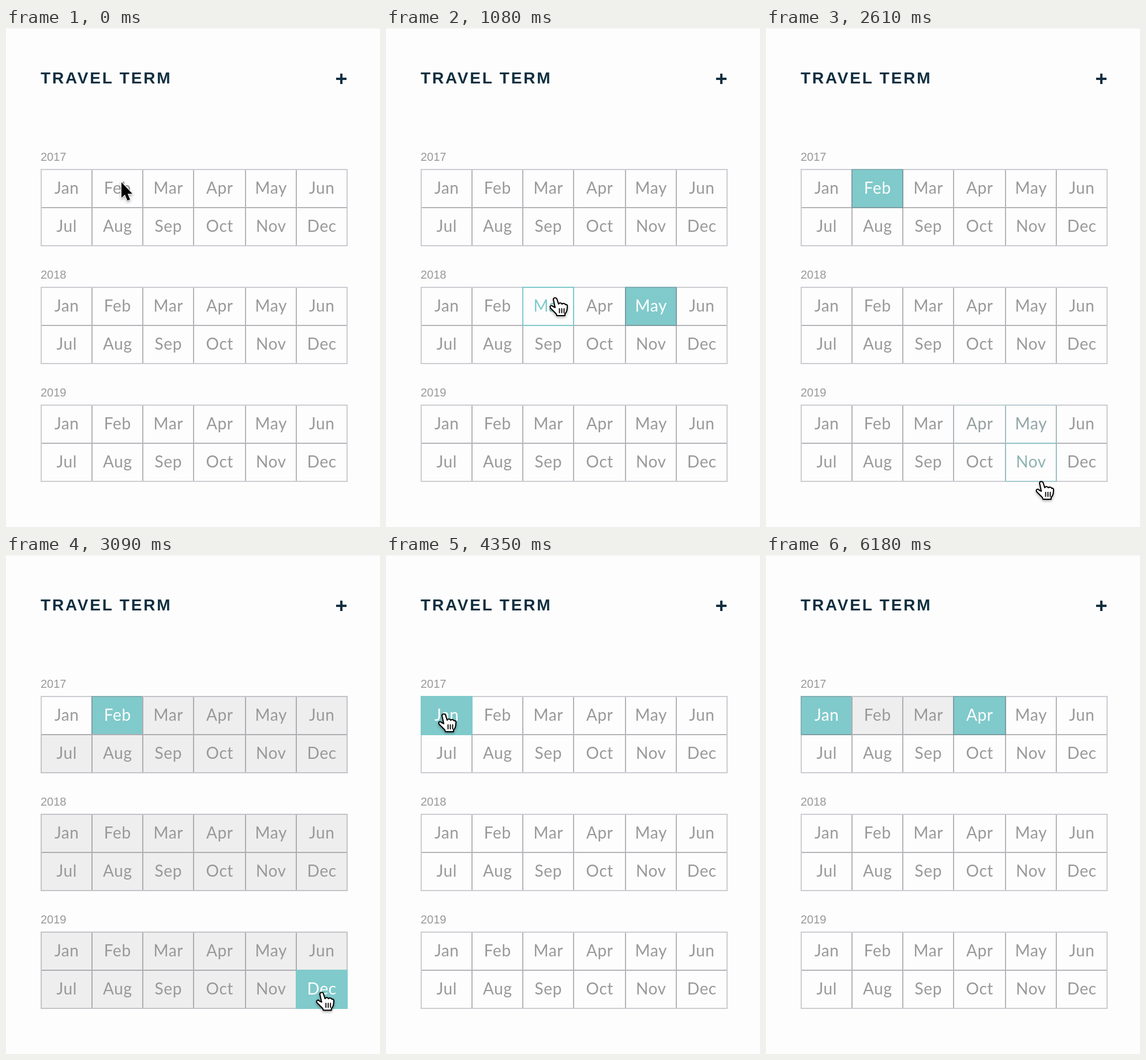
Recreate the animation shown at these times as an HTML page. Size 648 by 864 pixels, loop 6210 ms.

```html
<!DOCTYPE html>
<html lang="en">
<head>
<meta charset="utf-8">
<title>Travel term</title>
<style>
  html, body { margin: 0; width: 100%; height: 100%; overflow: hidden; background: #fdfdfd; }
  svg { display: block; width: 648px; height: 864px; }
  text { font-kerning: none; }
  .title { font: 700 28px "Liberation Sans", Arial, sans-serif; letter-spacing: 2.8px; fill: #102f40; }
  .year { font: 400 20px "Liberation Sans", Arial, sans-serif; fill: #999; }
  .month { font: 400 28px Lato, sans-serif; letter-spacing: .6px; text-anchor: middle; }
  .outer { stroke: rgba(130, 130, 145, .4); }
  .inner { stroke: rgba(120, 120, 130, .55); }
  .shadow { filter: drop-shadow(0 2px 2px rgba(0, 0, 0, .35)); }
</style>
</head>
<body>
<svg id="stage" viewBox="0 0 648 864">
  <path d="M0 .5H648" stroke="#f2f2f2"/>
  <text class="title" x="60" y="96">TRAVEL TERM</text>
  <path d="M572 88H590M581 79V97" stroke="#102f40" stroke-width="4"/>
  <g id="fills"></g>
  <g id="lines" fill="none" stroke-width="2"></g>
  <g id="hovers" fill="none" stroke="#80cacb" stroke-width="2"></g>
  <g id="labels"></g>
  <g id="cursor" class="shadow">
    <path id="arrow" d="M0 0V27L6 21.500L10.500 32L15 30L10.700 20H19Z" fill="#000"
      stroke="#fff" stroke-width="2" paint-order="stroke"/>
    <g id="hand" stroke="#000" stroke-width="2" stroke-linejoin="round" stroke-linecap="round">
      <path fill="#fff" d="M-3 3C-3 0 2 -1 3 2L6 11C8 8 11 9 12 11C14 9 17 10 18 12
        C20 11 22 13 21 17C21 22 20 25 17 28V31H3L2 28C-1 25 -5 21 -8 18C-10 14 -6 12 -4 15L0 17Z"/>
      <path d="M7.500 19V26M11.500 19V26M15.500 19V26" fill="none" stroke-width="1.800"/>
    </g>
  </g>
</svg>
<script>
const LOOP = 6210, STEP = 15, TRAIL = 8;
const COLS = [60, 148, 236, 324, 414, 502, 590];
const ROWS = [244, 310, 376];
const YEAR_GAP = 204;
const MONTHS = 'Jan Feb Mar Apr May Jun Jul Aug Sep Oct Nov Dec'.split(' ');

const BG = [253, 253, 253], TEAL = [128, 202, 203], RANGE = [238, 238, 238];
const GREY = [153, 153, 153], WHITE = [255, 255, 255];

// time, first and last selected month counted from Jan 2017
const PICKS = [
  [0, -1, -1], [690, 16, 16], [1200, 14, 14], [1950, 1, 1], [2940, 1, 35],
  [3390, 17, 35], [3440, 17, 17], [4170, 0, 0], [4890, 0, 3]
];

const EASE = {
  line: p => p,
  in: p => p * p,
  out: p => p * (2 - p),
  both: p => p * p * (3 - 2 * p)
};

// time, pointer tip, easing towards this point
const PATH = [
  [0, 200, 267], [60, 200, 267], [600, 455, 480, 'both'], [750, 455, 480], [1050, 293, 467, 'both'],
  [1290, 293, 467], [1800, 193, 284, 'both'], [2100, 193, 284], [2550, 446, 710, 'in'],
  [2610, 477, 785, 'out'], [2820, 546, 758, 'both'], [3180, 547, 757], [3375, 541, 500, 'both'],
  [3570, 541, 500], [4080, 100, 275, 'both'], [4440, 100, 275], [4800, 371, 277, 'both'],
  [4980, 371, 277], [5400, 570, 172, 'both'], [5640, 655, 140, 'in']
];

const $ = id => document.getElementById(id);

function add(parent, tag, attrs, text) {
  const el = document.createElementNS('http://www.w3.org/2000/svg', tag);
  for (const k in attrs) el.setAttribute(k, attrs[k]);
  if (text) el.textContent = text;
  parent.appendChild(el);
  return el;
}

const cells = [];
for (let y = 0; y < 3; y++) {
  const dy = y * YEAR_GAP;
  add($('labels'), 'text', { class: 'year', x: 60, y: 230 + dy }, String(2017 + y));
  MONTHS.forEach((name, m) => {
    const x = COLS[m % 6], right = COLS[m % 6 + 1] + 2;
    const row = Math.floor(m / 6), top = ROWS[row] + dy, bottom = ROWS[row + 1] + dy + 2;
    const w = right - x, h = bottom - top;
    cells.push({
      x, top, right, bottom,
      fill: add($('fills'), 'rect', { x, y: top, width: w, height: h }),
      ring: add($('hovers'), 'rect', { x: x + 1, y: top + 1, width: w - 2, height: h - 2 }),
      label: add($('labels'), 'text', { class: 'month', x: x + w / 2 + .3, y: top + 43 }, name)
    });
  });
  const t = ROWS[0] + dy + 1, b = ROWS[2] + dy + 1;
  add($('lines'), 'path', { class: 'outer', d: `M61 ${t}H591V${b}H61Z` });
  const verticals = COLS.slice(1, 6).map(x => `M${x + 1} ${t + 1}V${b - 1}`).join('');
  add($('lines'), 'path', { class: 'inner', d: `M62 ${ROWS[1] + dy + 1}H590${verticals}` });
}

function pointer(t) {
  const i = PATH.findIndex(k => k[0] > t);
  if (i < 0) return null;
  const [t0, x0, y0] = PATH[i - 1], [t1, x1, y1, ease = 'line'] = PATH[i];
  const p = EASE[ease]((t - t0) / (t1 - t0));
  return [x0 + (x1 - x0) * p, y0 + (y1 - y0) * p];
}

function hovered(t) {
  const p = t > 45 && pointer(t);
  if (!p) return -1;
  return cells.findIndex(c => p[0] >= c.x && p[0] < c.right && p[1] >= c.top && p[1] < c.bottom);
}

function stateAt(t) {
  let pick = PICKS[0];
  for (const p of PICKS) if (p[0] <= t) pick = p;
  return { first: pick[1], last: pick[2], hover: hovered(t) };
}

function mean(colors) {
  const sum = [0, 1, 2].map(k => colors.reduce((s, c) => s + c[k], 0) / colors.length);
  return `rgb(${sum.map(Math.round)})`;
}

// Averaging the recent states gives every change a linear fade.
function draw(t) {
  const states = [];
  for (let k = 0; k < TRAIL; k++) states.push(stateAt(Math.max(0, t - k * STEP)));

  cells.forEach((c, i) => {
    const chosen = s => i === s.first || i === s.last;
    const within = s => i > s.first && i < s.last;
    const fill = states.map(s => chosen(s) ? TEAL : within(s) ? RANGE : BG);
    const ink = states.map(s => chosen(s) ? WHITE : s.hover === i ? TEAL : GREY);
    const plain = fill.every(f => f === BG);
    c.fill.style.fill = plain ? 'none' : mean(fill);
    c.label.style.fill = mean(ink);
    c.ring.style.opacity = states.filter(s => s.hover === i).length / TRAIL;
  });

  const p = pointer(t), hand = states[0].hover >= 0;
  $('cursor').style.display = p ? '' : 'none';
  if (p) $('cursor').setAttribute('transform', `translate(${p[0].toFixed(1)} ${p[1].toFixed(1)})`);
  $('hand').style.display = hand ? '' : 'none';
  $('arrow').style.display = hand ? 'none' : '';
}

const start = performance.now();
function tick() {
  draw((performance.now() - start) % LOOP);
  requestAnimationFrame(tick);
}
tick();
</script>
</body>
</html>
```
